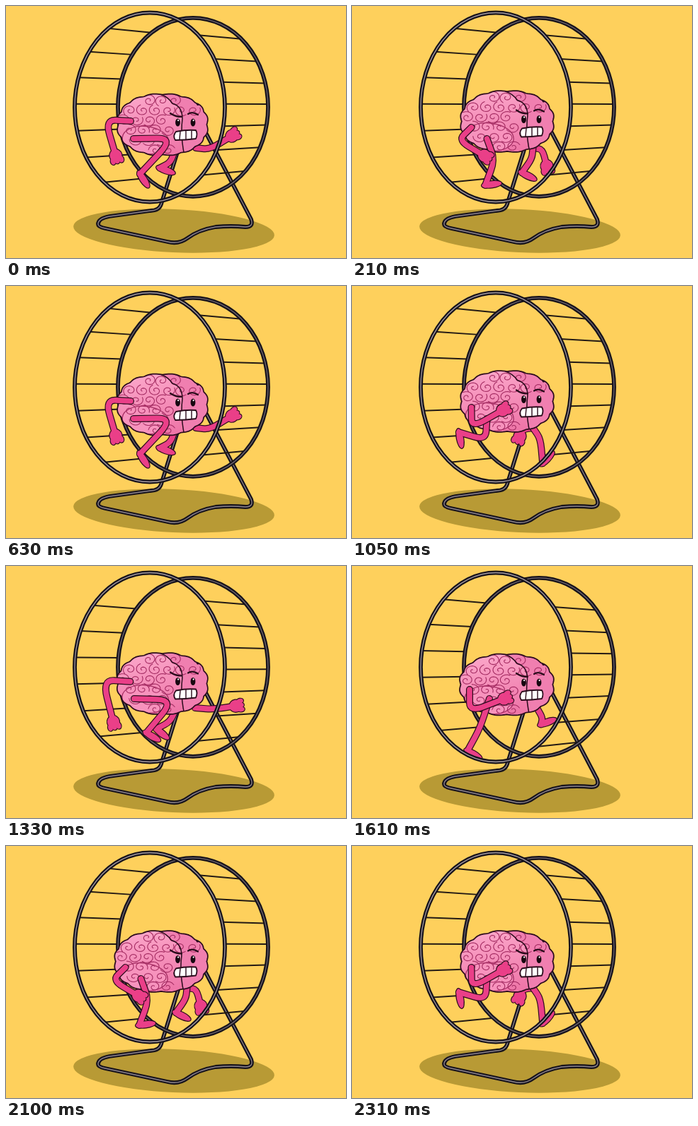
Recreate the animation shown at these times as an HTML page with a canvas. Size 480 px wide and 357 px high, loop 2380 ms.

```html
<!DOCTYPE html>
<html lang="en">
<head>
<meta charset="utf-8">
<title>Brain in a wheel</title>
<style>
html, body { margin: 0; height: 100%; overflow: hidden; background: #fed05c; }
canvas { display: block; width: 480px; height: 357px; }
</style>
</head>
<body>
<canvas width="480" height="357"></canvas>
<script>
const c = document.querySelector('canvas').getContext('2d');
const INK = '#2b0b1c', FOLD = '#a62e64', SKIN = '#ea3f88', TUBE = '#17131b';
const STEP = 70, STEPS = 34, CYCLE = 9, POSES = 12;
const RAD = Math.PI / 180;

// Each coordinate of a joint is a short Fourier series over the run cycle:
// mean, cos, sin, and optionally cos and sin at double speed.
const nearLeg = {
  root: [[187, -7, 0], [188]],
  bend: [[209, 28, 7.5], [208, -21, 0]],
  end: [[176, 13, 21.5], [233, -12, 21, 17, -6]],
  foot: [43, 14, -50]
};
const farLeg = {
  root: [[250, -11, 0], [201]],
  bend: [[251, -18, -7], [218, 3, 0]],
  end: [[242, -25, -17], [239, 2.5, -8.7, -12, 0]],
  foot: [0, 20, 42]
};
const nearArm = {
  root: [[171, 5, 0], [169, -6, 0]],
  bend: [[153, -13, -11], [184, -23, -6]],
  end: [[185, -30, -15], [200, 12, 21]]
};
const farArm = {
  root: [[260, 8, 0], [201]],
  bend: [[266, 22, 16], [203]],
  end: [[277, 42, 22], [208, -5, 8, -19, 0]]
};

function wave([mean, c1 = 0, s1 = 0, c2 = 0, s2 = 0], a) {
  return mean + c1 * Math.cos(a) + s1 * Math.sin(a) + c2 * Math.cos(2 * a) + s2 * Math.sin(2 * a);
}

function line(path, color, width) {
  c.strokeStyle = color;
  c.lineWidth = width;
  c.stroke(path);
}

function fill(path, color) {
  c.fillStyle = color;
  c.fill(path);
}

function oval(x, y, rx, ry, turn = 0) {
  const p = new Path2D();
  p.ellipse(x, y, rx, ry, turn, 0, 7);
  return p;
}

function tube(path, shine) {
  line(path, TUBE, 5.8);
  line(path, shine, 1.3);
}

function limb(joints, a) {
  const [root, bend, end] = ['root', 'bend', 'end'].map(k => joints[k].map(s => wave(s, a)));
  const toBend = p => p.map((v, i) => v + (bend[i] - v) * 0.58);
  const p = new Path2D();
  p.moveTo(...root);
  p.lineTo(...toBend(root));
  p.quadraticCurveTo(...bend, ...toBend(end));
  p.lineTo(...end);
  line(p, INK, 10);
  c.save();
  c.translate(...end);
  let tip;
  if (joints.foot) {
    c.rotate(wave(joints.foot, a) * RAD);
    tip = oval(9, 0, 14, 4.6);
    line(tip, INK, 2.4);
  } else {
    c.rotate(Math.atan2(end[1] - bend[1], end[0] - bend[0]));
    tip = oval(0, 0, 9, 8.5);
    const fingers = new Path2D();
    for (const y of [-6, 0, 6]) fingers.addPath(oval(7, y, 4.5, 3.3));
    line(tip, INK, 2.4);
    line(fingers, INK, 2.4);
    fill(fingers, SKIN);
  }
  fill(tip, SKIN);
  c.restore();
  line(p, SKIN, 7.6);
}

// Outline with a scalloped edge
const whole = new Path2D();
for (let d = 0; d < 360; d += 2) {
  const a = d * RAD, r = 0.975 + 0.035 * Math.abs(Math.sin(a * 8));
  const round = v => Math.sign(v) * Math.abs(v) ** 0.9 * r;
  whole.lineTo(221 + 64 * round(Math.cos(a)), 168 + 43.5 * round(Math.sin(a)));
}
whole.closePath();
const split = 'M218 125Q229 129 235 138Q249 142 249 160Q246 184 252 212';
const nearHalf = new Path2D(split + 'H150V125Z');
const lobe = oval(197, 190, 33, 19.5, 0.12);

let seed = 7;
function random() {
  seed = seed * 16807 % 2147483647;
  return seed / 2147483647;
}

// Curls on a staggered grid, leaving the face free
const curls = new Path2D();
for (let row = 0; row < 6; row++) {
  for (let x = 166 + row % 2 * 9; x < 282; x += 18) {
    const y = 134 + row * 14, start = random() * 6.3, dir = random() < 0.5 ? -1 : 1;
    const onFace = Math.abs(x - 254) < 24 && Math.abs(y - 171) < 23;
    if (onFace || Math.hypot((x - 221) / 64, (y - 168) / 43) > 0.9) continue;
    const curl = new Path2D();
    for (let s = 0; s <= 22; s++) {
      const a = start + dir * s * 0.38, r = 6.6 * (1.5 - s / 17);
      curl.lineTo(x + r * Math.cos(a), y + r * Math.sin(a) * 0.85);
    }
    curls.addPath(curl);
  }
}

function face() {
  for (const x of [242.5, 264]) {
    fill(oval(x, 165, 3.4, 5.6), '#170710');
    fill(oval(x + 0.6, 162, 1, 1.3), '#fff');
  }
  line(new Path2D('M232 152Q239 157 248 157M257 153Q263 149 271 154'), INK, 2.2);
  const mouth = new Path2D('M240 178Q254 175 268 176Q271 181 268 188Q254 190 239 190Q235 184 240 178Z');
  fill(mouth, '#fff');
  line(mouth, INK, 1.8);
  line(new Path2D('M246 178L245 189M254 177V189M262 177V188'), INK, 1.4);
}

const glow = c.createLinearGradient(190, 126, 205, 212);
glow.addColorStop(0, '#fba6c9');
glow.addColorStop(1, '#ee76a8');

function brain(a) {
  const wide = 1.02 - 0.02 * Math.cos(a);
  c.save();
  c.translate(0, 3 * Math.cos(2 * a) - 3);
  c.save();
  c.translate(285 * (1 - wide), 0);
  c.scale(wide, 1);
  fill(whole, '#f07fb0');
  c.save();
  c.clip(whole);
  fill(nearHalf, glow);
  fill(lobe, '#f793bd');
  line(curls, FOLD, 1.1);
  line(lobe, FOLD, 1.3);
  line(new Path2D(split), INK, 1.5);
  line(new Path2D('M257 128Q268 130 271 139'), INK, 4);
  c.restore();
  line(whole, INK, 1.7);
  c.restore();
  face();
  c.restore();
}

// Rungs spread out towards the top and bottom of the wheel.
function rungs(side, gap, spread, shift) {
  const p = new Path2D();
  for (let i = -4; i <= 4; i++) {
    const u = i + shift, deg = gap * u + spread * u ** 3 - 2;
    if (Math.abs(deg) > 60) continue;
    const x = side * 106 * Math.cos(deg * RAD), y = Math.sin(deg * RAD);
    p.moveTo(203 + x, 143.5 + 134 * y);
    p.lineTo(264 + x, 143.3 + 126.5 * y);
  }
  line(p, '#231a14', 2);
}

const stand = new Path2D(`M262 143L219 281Q216 290 204 290L146 298Q130 301 130 309Q130 313 140 315L228 334
  Q244 338 256 329Q272 317 296 313Q318 311 338 313Q350 313 346 302L263 143`);

function draw(step) {
  const pose = Math.floor(step % CYCLE * POSES / CYCLE);
  const a = pose / POSES * 2 * Math.PI, turn = pose % 4 / 4;
  fill(new Path2D('M0 0H480V357H0Z'), '#fed05c');
  fill(oval(237, 318.5, 142, 30.5, 0.045), '#b89a35');
  tube(stand, '#8b838e');
  // The left side climbs while the right side drops.
  rungs(-1, 16.1, 0.23, -turn);
  rungs(1, 13.2, 0.3, turn);
  tube(oval(264, 143.3, 106, 126.5), '#6d6570');
  limb(farArm, a);
  limb(farLeg, a);
  brain(a);
  limb(nearLeg, a);
  limb(nearArm, a);
  tube(oval(203, 143.5, 106, 134), '#a39aa2');
}

c.lineCap = c.lineJoin = 'round';
const start = performance.now();
function tick() {
  draw(Math.floor((performance.now() - start) / STEP) % STEPS);
  requestAnimationFrame(tick);
}
tick();
</script>
</body>
</html>
```
